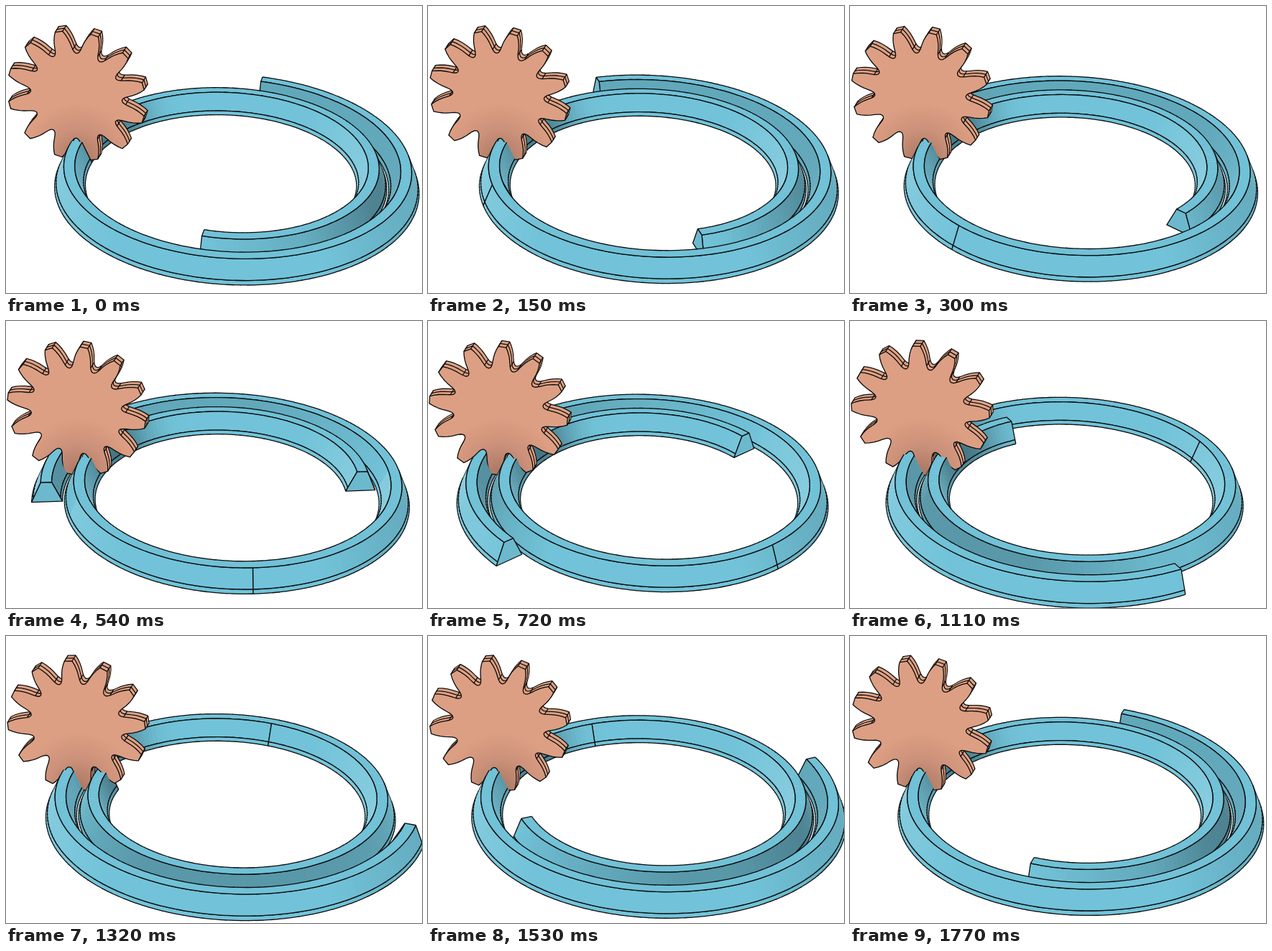
Recreate the animation shown at these times as an HTML page with a canvas. Size 579 by 400 pixels, loop 1.8 s.

```html
<!DOCTYPE html>
<html>
<head>
<meta charset="utf-8">
<title>Spiral rack and gear</title>
<style>
html, body { margin: 0; width: 579px; height: 400px; overflow: hidden; background: #fff; }
canvas { display: block; }
</style>
</head>
<body>
<canvas id="stage" width="579" height="400"></canvas>
<script>
const ctx = document.getElementById('stage').getContext('2d');
const LOOP = 1800, TAU = 2 * Math.PI, RAD = Math.PI / 180;

// Spiral: 1.5 turns, radius measured at the outer top edge
const SLICES = 270, STEP = 1.5 * TAU / SLICES, R0 = 194.5, PITCH = 45;
// Wall section from outer foot over the top to inner foot: [radial, height]
const SECTION = [[13.3, -31], [11, -25.5], [0, 0], [-15, 0], [-26.5, -25.5], [-29, -31]];
const GEAR_Y = 37;

// Gear: 12 teeth, half tooth outline as [degrees, radius]
const HALF = [[3.2, 1], [5, .945], [6.8, .88], [8.2, .82], [9.4, .76], [10.5, .715], [12, .68], [13.5, .665], [15, .66]];
const TOOTH = [...HALF.slice(0, -1).reverse().map(([d, r]) => [-d, r]), ...HALF];
const RIDGES = [HALF[0], HALF[5]].flatMap(([d, r]) => [[-d, r], [d, r]]);

function project(phi, dr, z, turn) {
  const r = R0 + PITCH * phi / TAU + dr;
  const X = r * Math.cos(phi + turn), Y = r * Math.sin(phi + turn);
  const f = 1 / (1 + .0004 * Y - .00024 * z);
  const u = X * f, v = (.508 * Y + .861 * z) * f;
  return [312.3 + u + .04 * v, 216.3 - v + .04 * u];
}

function area(pts) {
  return pts.reduce((sum, [x, y], i) => {
    const [nx, ny] = pts[(i + 1) % pts.length];
    return sum + x * ny - nx * y;
  }, 0);
}

function path(pts, closed) {
  ctx.beginPath();
  pts.forEach(p => ctx.lineTo(...p));
  if (closed) ctx.closePath();
}

function fill(pts, color) {
  path(pts, true);
  ctx.fillStyle = color;
  ctx.fill();
}

function line(...pts) {
  path(pts);
  ctx.stroke();
}

function blue(level, white = 0) {
  const mix = c => Math.round(c * level + (255 - c * level) * white);
  return `rgb(${mix(114)},${mix(195)},${mix(217)})`;
}

const clamp = v => Math.max(0, Math.min(1, v));

// Light comes from the left; walls facing a neighbouring turn or the gear are darker
function shade(strip, phi, turn, [x, y]) {
  if (strip === 2) return blue(.99);
  const outer = strip < 2;
  const buried = outer ? .22 * clamp(phi / 1.3) * clamp(Math.PI + .2 - phi)
                       : .14 * clamp((phi - TAU) / 1.3);
  const nearGear = .3 * Math.exp(-((x - 150) ** 2 + (y - 165) ** 2) / 2600);
  const right = Math.cos(phi + turn) * (outer ? 1 : -1);
  const level = 1 - Math.max(buried, nearGear) - .25 * Math.max(0, right - .5);
  return blue(level, buried ? 0 : .3 * Math.max(0, -right - .6));
}

function drawSlice(i, turn) {
  const ring = k => {
    const phi = Math.min(SLICES, Math.max(0, k)) * STEP;
    return SECTION.map(([dr, z]) => project(phi, dr, z, turn));
  };
  const quad = (a, b, j) => [a[j + 1], b[j + 1], b[j], a[j]];
  const a = ring(i), b = ring(i + 1), prev = ring(i - 1), next = ring(i + 2);
  const a2 = ring(i - .06), b2 = ring(i + 1.06);   // slight overlap hides seams
  const isEdge = (k, j) => k === 0 || k === SLICES || (k === SLICES / 2 && j !== 2);

  for (let j = 0; j < 5; j++) {
    if (area(quad(a, b, j)) <= 0) continue;
    fill(quad(a2, b2, j), shade(j, (i + .5) * STEP, turn, a[j]));
    line(a2[j], b2[j]);
    line(a2[j + 1], b2[j + 1]);
    if (isEdge(i, j) || area(quad(prev, a, j)) <= 0) line(a[j], a[j + 1]);
    if (isEdge(i + 1, j) || area(quad(b, next, j)) <= 0) line(b[j], b[j + 1]);
  }

  const cap = i === 0 && area(a) < 0 ? a : i === SLICES - 1 && area(b) > 0 ? b : null;
  if (cap) {
    fill(cap, blue(.95));
    ctx.stroke();
  }
}

function drawGear(angle) {
  const spot = (deg, r, depth) => {
    const c = r * Math.cos(deg * RAD), s = r * Math.sin(deg * RAD);
    return [98 + 96 * c - 5.5 * s + 5 * depth, 125 + 5 * c - 90 * s - 8 * depth];
  };
  const eachTooth = (pts, use) => {
    for (let n = 0; n < 12; n++)
      for (const [d, r] of pts) use(angle + 30 * n + d, r);
  };
  const outline = depth => {
    const pts = [];
    eachTooth(TOOTH, (deg, r) => pts.push(spot(deg, r, depth)));
    return pts;
  };

  for (let k = 10; k > 0; k--) {
    fill(outline(k / 10), '#dda083');
    if (k % 5 === 0) ctx.stroke();
  }
  eachTooth(RIDGES, (deg, r) => line(spot(deg, r, 1), spot(deg, r, 0)));

  const face = ctx.createRadialGradient(100, 214, 5, 100, 214, 80);
  face.addColorStop(0, '#ac7964');
  face.addColorStop(.5, '#cc917a');
  face.addColorStop(1, '#dd9f83');
  fill(outline(0), face);
  ctx.stroke();
}

function draw(time) {
  const t = Math.floor(time % LOOP / 30) * 30 / LOOP;
  const turn = -99.7 * RAD + TAU * t;
  ctx.fillStyle = '#fff';
  ctx.fillRect(0, 0, 579, 400);
  ctx.strokeStyle = '#0a0a0a';
  ctx.lineWidth = 1.3;
  ctx.lineJoin = 'round';

  const parts = [{ y: GEAR_Y, paint: () => drawGear(11.5 + 30 * t) }];
  for (let i = 0; i < SLICES; i++) {
    const phi = (i + .5) * STEP;
    const r = R0 + PITCH * phi / TAU - 7.5;
    parts.push({ y: r * Math.sin(phi + turn), paint: () => drawSlice(i, turn) });
  }
  parts.sort((p, q) => q.y - p.y).forEach(p => p.paint());
}

const start = performance.now();
function tick() {
  draw(performance.now() - start);
  requestAnimationFrame(tick);
}
tick();
</script>
</body>
</html>
```
